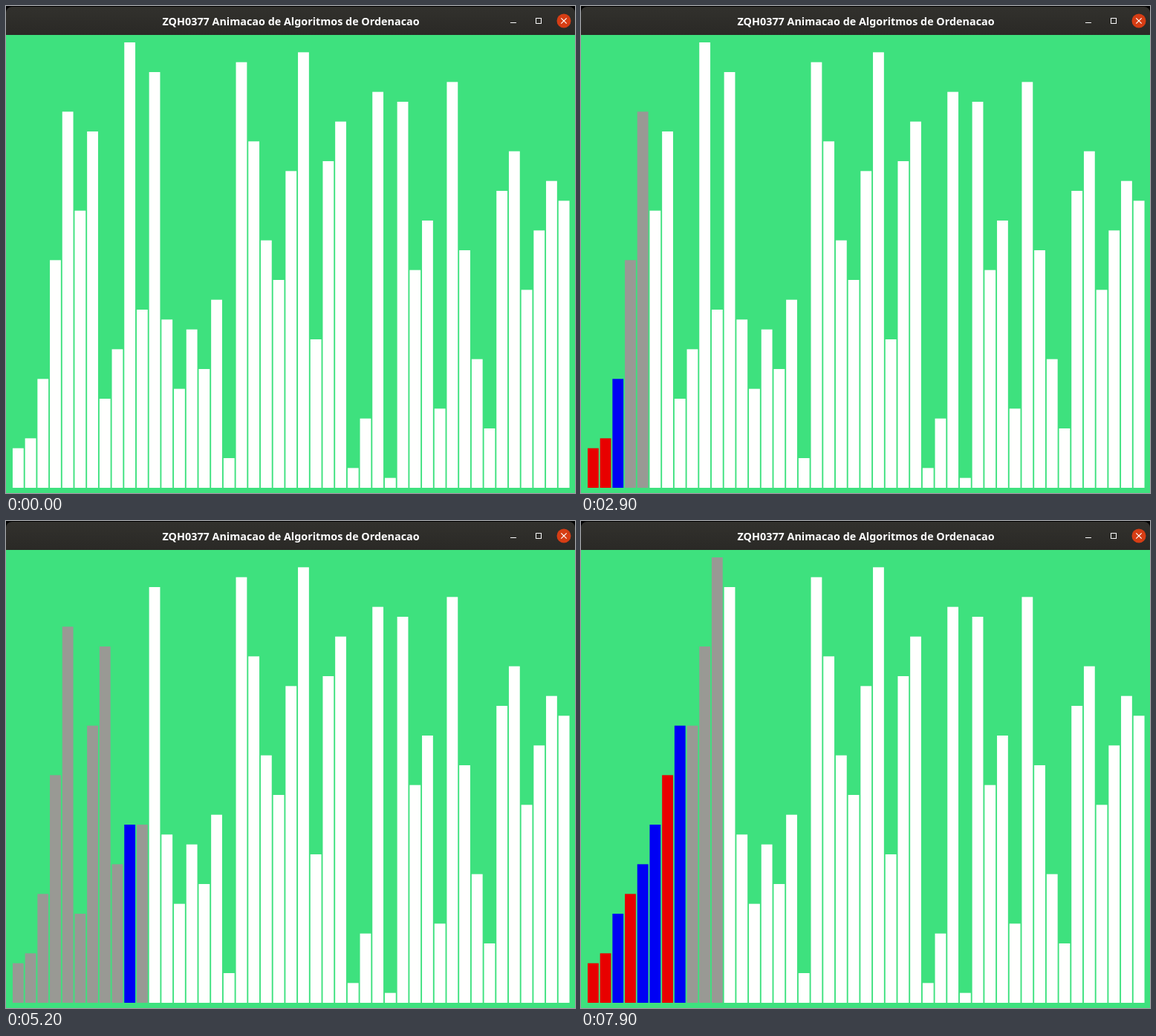
Write an HTML page with a canvas that moves like this. It is 766 by 656 pixels and loops after 8000 ms.

```html
<!DOCTYPE html>
<html lang="pt">
<head>
<meta charset="utf-8">
<title>Animacao de Algoritmos de Ordenacao</title>
<style>
  html, body { margin: 0; width: 100%; height: 100%; overflow: hidden; background: #000; }
  canvas { display: block; }
</style>
</head>
<body>
<canvas id="stage" width="766" height="656"></canvas>
<script>
const ctx = document.getElementById('stage').getContext('2d');

const GREEN = '#3ee17e', WHITE = '#fffffe', GRAY = '#999994', RED = '#e80000', BLUE = '#0000f4';
const LOOP = 8000, HOLD = 500, STEP = 100;

const values = [
  4, 5, 11, 23, 38, 28, 36, 9, 14, 45, 18, 42, 17, 10, 16,
  12, 19, 3, 43, 35, 25, 21, 32, 44, 15, 33, 37, 2, 7, 40,
  1, 39, 22, 27, 8, 41, 24, 13, 6, 30, 34, 20, 26, 31, 29
];
const colors = values.map(() => WHITE);

// Every visible step of the merge sort is stored as a snapshot.
const snapshots = [];
const snap = () => snapshots.push({ values: [...values], colors: [...colors] });

function paint(from, to, color) {
  colors.fill(color, from, to);
}

function merge(lo, mid, hi) {
  const left = values.slice(lo, mid), right = values.slice(mid, hi);
  paint(lo, mid, RED);
  paint(mid, hi, BLUE);
  snap();
  paint(lo, hi, GRAY);
  for (let i = lo; i < hi; i++) {
    const takeLeft = left.length && (!right.length || left[0] < right[0]);
    values[i] = (takeLeft ? left : right).shift();
    colors[i] = takeLeft ? RED : BLUE;
    snap();
  }
  paint(lo, hi, WHITE);
  snap();
}

function sort(lo, hi) {
  if (hi - lo > 1) {
    const mid = (lo + hi) >> 1;
    sort(lo, mid);
    sort(mid, hi);
    merge(lo, mid, hi);
  }
  paint(lo, hi, GRAY);
  snap();
}

snap();
sort(0, 11);

function drawWindow() {
  ctx.fillStyle = '#000';
  ctx.fillRect(0, 0, 766, 656);
  const bar = ctx.createLinearGradient(0, 1, 0, 39);
  bar.addColorStop(0, '#32312d');
  bar.addColorStop(1, '#2a2926');
  ctx.fillStyle = bar;
  ctx.beginPath();
  ctx.roundRect(0, 1, 766, 50, [8, 8, 0, 0]);
  ctx.fill();
  ctx.fillStyle = GREEN;
  ctx.fillRect(0, 39, 766, 617);

  ctx.fillStyle = '#fff';
  ctx.font = 'bold 14.35px "Noto Sans", "Open Sans", sans-serif';
  ctx.textAlign = 'center';
  ctx.fillText('ZQH0377 Animacao de Algoritmos de Ordenacao', 383.5, 26);

  // minimise, maximise and close buttons
  ctx.fillRect(679, 22, 8, 1);
  ctx.strokeStyle = '#fff';
  ctx.lineWidth = 1;
  ctx.strokeRect(713.5, 16.5, 7, 7);
  ctx.fillStyle = '#d63d14';
  ctx.beginPath();
  ctx.arc(751, 20, 9.5, 0, Math.PI * 2);
  ctx.fill();
  ctx.lineWidth = 1.2;
  ctx.beginPath();
  ctx.moveTo(747.3, 16.3);
  ctx.lineTo(754.7, 23.7);
  ctx.moveTo(754.7, 16.3);
  ctx.lineTo(747.3, 23.7);
  ctx.stroke();
}

function drawBars({ values, colors }) {
  values.forEach((value, i) => {
    const height = value * 40 / 3;
    ctx.fillStyle = colors[i];
    ctx.fillRect(8.95 + i * 16.7, 649 - height, 14.8, height);
  });
}

function frame() {
  const time = performance.now() % LOOP;
  const step = Math.max(0, Math.floor((time - HOLD) / STEP) + 1);
  drawWindow();
  drawBars(snapshots[Math.min(step, snapshots.length - 1)]);
  requestAnimationFrame(frame);
}
frame();
</script>
</body>
</html>
```
